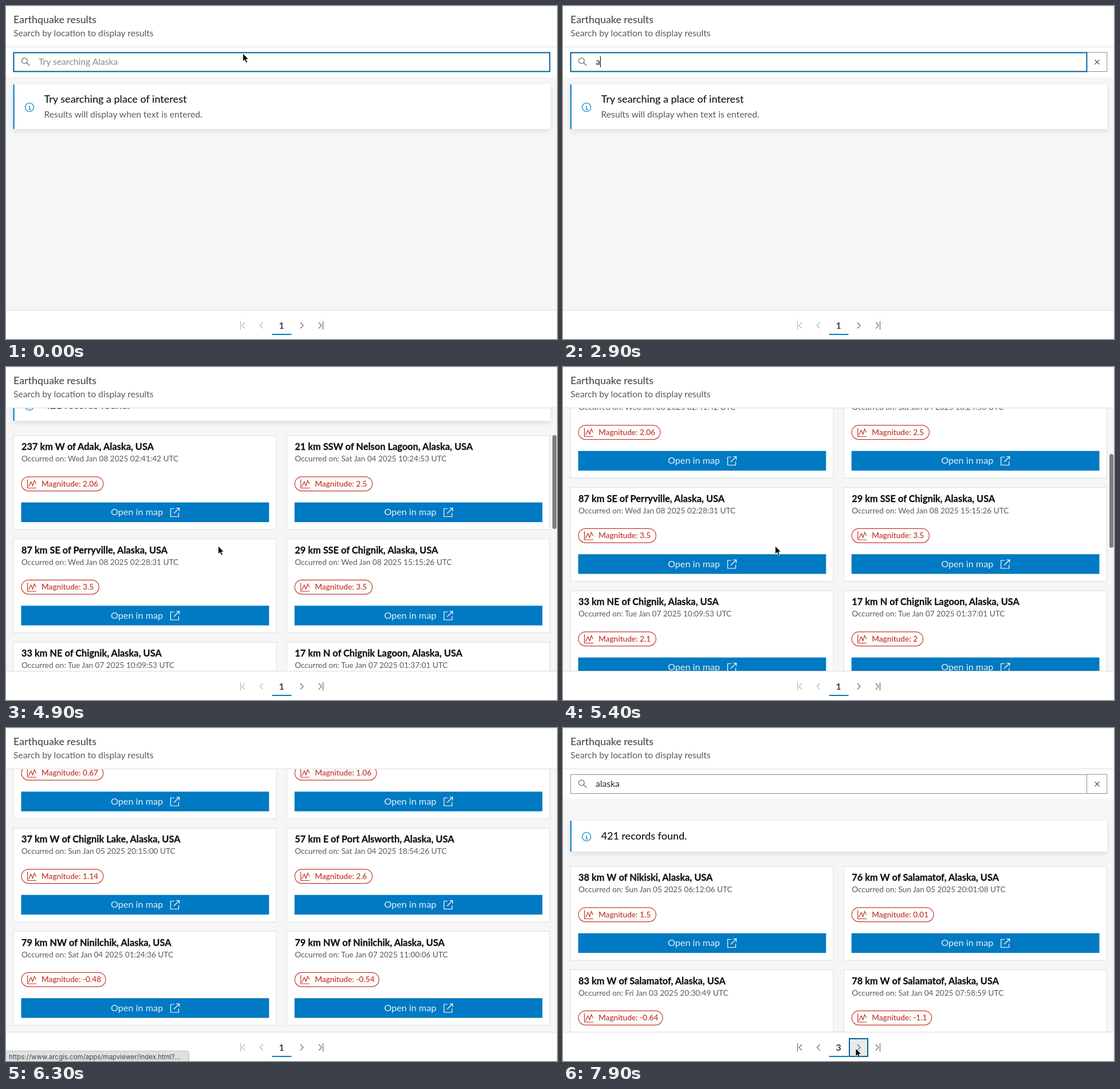
Recreate the animation shown at these times as an HTML page. Size 962x582 px, loop 8 s.

```html
<!DOCTYPE html>
<html lang="en">
<head>
<meta charset="utf-8">
<title>Earthquake results</title>
<style>
html, body { margin: 0; width: 100%; height: 100%; overflow: hidden; background: #fff; }
svg { display: block; width: 962px; height: 582px; font-family: Lato, "Open Sans", sans-serif; }
text { white-space: pre; }
.head { font-size: 17.8px; font-weight: 500; fill: #4a4a4a; }
.body { font-size: 15.7px; fill: #5a5a5a; }
.lead { font-size: 18px; font-weight: 500; fill: #151515; }
.name { font-size: 16.3px; font-weight: 700; letter-spacing: .05px; fill: #111; stroke: #111; stroke-width: .3px; }
.date { font-size: 13.6px; fill: #5a5a5a; }
.mag { font-size: 13.7px; font-weight: 500; fill: #c02f20; }
.open { font-size: 16.2px; fill: #e4f0f8; }
.line { fill: none; stroke-width: 1.2; }
.notice { filter: drop-shadow(0 4px 4px rgba(0,0,0,.09)); }
</style>
</head>
<body>
<svg viewBox="0 0 962 582">
  <defs>
    <clipPath id="view"><rect y="72" width="962" height="459"/></clipPath>
    <g id="info" class="line" stroke="#007ac2">
      <circle r="7.5"/>
      <path d="M-1.5 -1H.5V4M-2 4H2.5"/>
      <circle cx="0" cy="-3.7" r=".5" fill="#007ac2" stroke="none"/>
    </g>
    <g id="graph" class="line" stroke="#c02f20">
      <path d="M37.5 318.5V333.5H53M39.5 331L43.5 322.5L46.5 329.5L49.5 320.5L52.5 326.5"/>
    </g>
    <g id="launch" class="line" stroke="#fff">
      <path d="M294 369.5H287.5V383.5H301.5V377M297 368.5H302.5V374M302 369L293 378"/>
    </g>
  </defs>

  <rect width="962" height="582" fill="#fff"/>
  <g clip-path="url(#view)">
    <rect y="72" width="962" height="460" fill="#f6f6f6"/>
    <g id="scroll">
      <rect y="72" width="962" height="52" fill="#fff"/>
      <g id="clear" class="line" stroke="#8c8c8c">
        <rect x="914.5" y="81" width="35.3" height="33.5" stroke-width="1"/>
        <path d="M928.5 94L936.5 102M936.5 94L928.5 102" stroke="#555"/>
      </g>
      <rect id="field" x="13.4" y="81.5" height="33" fill="#fff"/>
      <g class="line" stroke="#6a6a6a"><circle cx="32.3" cy="95.7" r="4.9"/><path d="M35.9 99.3L41.3 104.3"/></g>
      <text id="query" class="body" x="57" y="103"></text>
      <rect id="caret" y="88" width="1.2" height="19" fill="#111"/>

      <g id="empty">
        <rect class="notice" x="12.6" y="137" width="937.4" height="78" fill="#fff"/>
        <rect x="12.6" y="137" width="2.1" height="78" fill="#007ac2"/>
        <use href="#info" x="41" y="177"/>
        <text class="lead" x="66.5" y="168.5">Try searching a place of interest</text>
        <text class="body" x="66.5" y="195">Results will display when text is entered.</text>
      </g>
      <g id="found">
        <rect class="notice" x="12.6" y="162" width="937.4" height="54" fill="#fff"/>
        <rect x="12.6" y="162" width="2.1" height="54" fill="#007ac2"/>
        <use href="#info" x="41" y="190"/>
        <text id="count" class="lead" x="66.5" y="194.5"></text>
      </g>
      <g id="lists"></g>
    </g>
    <rect id="thumb" x="954" width="7" height="164" rx="3.5" fill="#7d7d7d"/>
  </g>

  <rect y="71" width="962" height="1" fill="#dcdcdc"/>
  <rect width="962" height="1" fill="#e9e9e9"/>
  <rect x="961" width="1" height="582" fill="#ececec"/>
  <text class="head" x="13" y="29.5">Earthquake results</text>
  <text class="body" x="13" y="52.5">Search by location to display results</text>

  <rect y="531" width="961" height="51" fill="#fff"/>
  <rect y="531" width="962" height="1" fill="#d9d9d9"/>
  <rect id="next" x="500" y="543" width="32" height="31" stroke-width="2"/>
  <g class="line" stroke-width="1.3">
    <g id="back"><path d="M409.5 551V565.5M417 553L412 558.3L417 563.5"/><path d="M448.5 553L443.5 558.3L448.5 563.5"/></g>
    <path id="arrow" d="M514 553L519 558.3L514 563.5"/>
    <path d="M546 553L551 558.3L546 563.5M553.5 551V565.5" stroke="#6a6a6a"/>
  </g>
  <text id="page" x="481" y="563.7" text-anchor="middle" font-size="15.8" font-weight="500" fill="#151515"></text>
  <rect x="464.5" y="573" width="34" height="2" fill="#007ac2"/>

  <g id="link">
    <path d="M-1 564.5H315Q319.5 564.5 319.5 569V583H-1Z" fill="#dfe0e2" stroke="#bdbec0"/>
    <text x="5" y="578.5" font-size="11.5" fill="#3f4245" style="font-family:Inter,sans-serif">https://www.arcgis.com/apps/mapviewer/index.html?...</text>
  </g>
  <path id="cursor" d="M0 0V13.8L3.1 10.9L5.5 16.2L7.8 15.2L5.5 10H9.8Z" fill="#000" stroke="#fff" stroke-width=".8"/>
</svg>
<script>
const $ = id => document.getElementById(id);
const show = (id, on) => $(id).setAttribute('display', on ? 'inline' : 'none');
const set = (id, attrs) => { for (const k in attrs) $(id).setAttribute(k, attrs[k]); };

// place | date and time | magnitude
const lists = {
  green: `Balleny Islands region|Thu Jan 02 2025 02:54:17|5.5
west of Macquarie Island|Thu Dec 19 2024 02:07:02|5.7
78 km E of Wainui, New Zealand|Sat Dec 14 2024 10:20:23|5.2
44 km NE of Āwash, Ethiopia|Fri Jan 03 2025 17:01:45|5.5`,
  page1: `237 km W of Adak, Alaska, USA|Wed Jan 08 2025 02:41:42|2.06
21 km SSW of Nelson Lagoon, Alaska, USA|Sat Jan 04 2025 10:24:53|2.5
87 km SE of Perryville, Alaska, USA|Wed Jan 08 2025 02:28:31|3.5
29 km SSE of Chignik, Alaska, USA|Wed Jan 08 2025 15:15:26|3.5
33 km NE of Chignik, Alaska, USA|Tue Jan 07 2025 10:09:53|2.1
17 km N of Chignik Lagoon, Alaska, USA|Tue Jan 07 2025 01:37:01|2
41 km W of Chignik Lake, Alaska, USA|Mon Jan 06 2025 04:32:18|0.67
38 km W of Chignik Lake, Alaska, USA|Sun Jan 05 2025 22:47:09|1.06
37 km W of Chignik Lake, Alaska, USA|Sun Jan 05 2025 20:15:00|1.14
57 km E of Port Alsworth, Alaska, USA|Sat Jan 04 2025 18:54:26|2.6
79 km NW of Ninilchik, Alaska, USA|Sat Jan 04 2025 01:24:36|-0.48
79 km NW of Ninilchik, Alaska, USA|Tue Jan 07 2025 11:00:06|-0.54`,
  page2: `80 km NW of Ninilchik, Alaska, USA|Mon Jan 06 2025 09:18:44|-0.32
64 km W of Ninilchik, Alaska, USA|Sun Jan 05 2025 13:40:27|1.2
12 km SW of Nikiski, Alaska, USA|Sat Jan 04 2025 16:05:12|1.8
75 km W of Salamatof, Alaska, USA|Fri Jan 03 2025 11:22:50|0.15`,
  page3: `38 km W of Nikiski, Alaska, USA|Sun Jan 05 2025 06:12:06|1.5
76 km W of Salamatof, Alaska, USA|Sun Jan 05 2025 20:01:08|0.01
83 km W of Salamatof, Alaska, USA|Fri Jan 03 2025 20:30:49|-0.64
78 km W of Salamatof, Alaska, USA|Sat Jan 04 2025 07:58:59|-1.1`
};

function pillWidth(mag) {
  let w = 117;
  for (const c of mag) w += c === '.' ? 3.5 : c === '-' ? 4.2 : 7.5;
  return w;
}

function card(row, i) {
  const [name, date, mag] = row.split('|');
  return `<g transform="translate(${i % 2 * 477.2} ${(i >> 1) * 180.5})">
    <rect x="13" y="242" width="459" height="164" fill="#fff" stroke="#dedede"/>
    <text class="name" x="27" y="267">${name}</text>
    <text class="date" x="27" y="287">Occurred on: ${date} UTC</text>
    <rect class="line" x="27" y="313.8" width="${pillWidth(mag) - .2}" height="24.8" rx="12.4" stroke="#c8382a"/>
    <use href="#graph"/>
    <text class="mag" x="62" y="330.5">Magnitude: ${mag}</text>
    <rect x="26.5" y="358.7" width="432.8" height="34.4" fill="#007ac2"/>
    <text class="open" x="183" y="381.3">Open in map</text>
    <use href="#launch"/>
  </g>`;
}

$('lists').innerHTML = Object.entries(lists).map(([id, rows]) =>
  `<g id="${id}">${rows.split('\n').map(card).join('')}</g>`).join('');

const typed = [[-500, ''], [200, 'g'], [300, 'gr'], [400, 'gre'], [500, 'gree'], [700, 'green'],
  [2100, 'gre'], [2200, ''], [2900, 'a'], [3000, 'al'], [3200, 'ala'], [3400, 'alas'],
  [3500, 'alask'], [3700, 'alaska']];
const views = [[0, ''], [1200, 'green'], [2700, ''], [4200, 'page1'], [7000, 'page2'], [7500, 'page3']];
const path = [[0, 413.6, 83], [4100, 413.6, 83], [4200, 416.6, 87], [4700, 370.6, 313], [6300, 370.6, 313],
  [6900, 512, 558], [7200, 512, 558], [7300, 511, 560], [8000, 511, 560]];

const latest = (list, t) => list.filter(e => e[0] <= t).pop();

function pointAt(t) {
  const i = path.findIndex(p => p[0] > t);
  const [t0, x0, y0] = path[i - 1], [t1, x1, y1] = path[i];
  const u = (t - t0) / (t1 - t0), k = u * u * (3 - 2 * u);
  return [x0 + (x1 - x0) * k, y0 + (y1 - y0) * k];
}

// Two flicks of the wheel, each slowing down exponentially
function scrollAt(t) {
  if (t < 4800 || t >= 7000) return 0;
  const flick = (start, dist, tau) => t < start ? 0 : dist * (1 - Math.exp(-(t - start) / tau));
  return Math.round(Math.min(789, flick(4800, 213.2, 117.5) + flick(5450, 577, 125)));
}

function draw(t) {
  const [keyTime, text] = latest(typed, t);
  const view = latest(views, t)[1];
  const focused = t < 7000;
  const y = scrollAt(t);

  set('scroll', { transform: `translate(0 ${-y})` });
  set('thumb', { y: 74 + y * .368 });
  show('thumb', t >= 4900 && t < 6200);

  show('clear', text);
  set('field', {
    width: text ? 901 : 936,
    stroke: focused ? '#00619b' : '#8c8c8c',
    'stroke-width': focused ? 2 : 1
  });
  $('query').textContent = text || 'Try searching Alaska';
  $('query').style.fill = text ? '#2b2b2b' : '#8a8a8a';
  const end = text ? $('query').getComputedTextLength() : 0;
  set('caret', { x: 57 + end });
  show('caret', focused && (t - keyTime) % 1000 < 500);

  show('empty', !view);
  show('found', view);
  $('count').textContent = `${view === 'green' ? 54 : 421} records found.`;
  for (const id in lists) show(id, id === view);

  const page = view === 'page3' ? 3 : view === 'page2' ? 2 : 1;
  const hover = t >= 6900;
  $('page').textContent = page;
  set('back', { stroke: page > 1 ? '#6a6a6a' : '#b5b5b5' });
  set('next', { fill: hover ? '#eaeaea' : 'none', stroke: t >= 7000 ? '#00619b' : 'none' });
  set('arrow', { stroke: hover ? '#007ac2' : '#6a6a6a' });

  show('link', t >= 5600 && t < 6600);
  const [px, py] = pointAt(t);
  set('cursor', { transform: `translate(${px} ${py})` });
  show('cursor', t < 100 || (t >= 4200 && t < 5600) || t >= 6400);
}

const STEP = 100, LOOP = 8000;
function tick() {
  const t = performance.now() % LOOP;
  draw(Math.floor(t / STEP) * STEP);
  requestAnimationFrame(tick);
}
tick();
</script>
</body>
</html>
```
